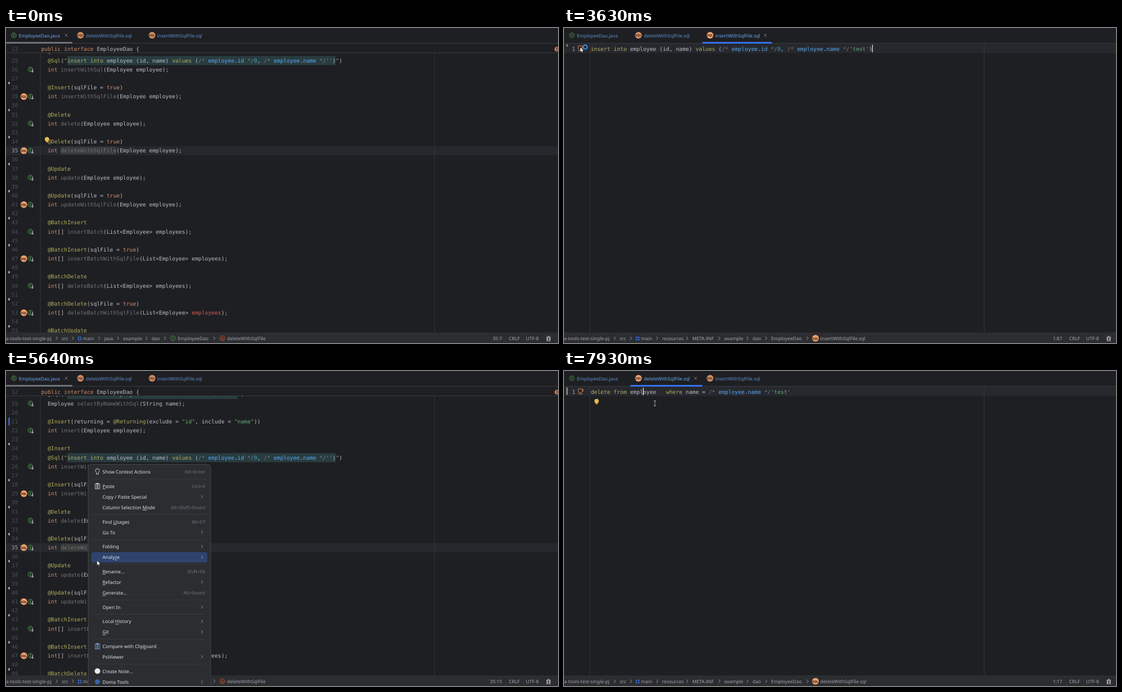
An HTML page with a canvas for the animation above (8000 ms loop, 990 px wide and 565 px high).

```html
<!DOCTYPE html>
<html lang="en">
<head>
<meta charset="utf-8">
<title>Jumping between DAO and SQL files</title>
<style>
  html, body { margin: 0; width: 100%; height: 100%; overflow: hidden; background: #1e1f22; }
  canvas { display: block; }
</style>
</head>
<body>
<canvas id="stage" width="990" height="565"></canvas>
<script>
const ctx = document.getElementById('stage').getContext('2d');
const LOOP = 8000, ROW = 16.16, CHAR = 5.872;
const MONO = '9.75px "DejaVu Sans Mono", monospace';
const UI = '8.5px "Noto Sans", "Open Sans", sans-serif';
const BADGE = 'bold 5.4px "Open Sans", sans-serif';
const C = {
  bg: '#1e1f22', panel: '#2b2d30', line: '#393b40', row: '#26282e', plain: '#bcbec4', ui: '#a3a6ad',
  ann: '#b3ae60', sql: '#b3ae60', key: '#cf8e6d', str: '#6aab73', dim: '#6f737a', rem: '#7a7e85',
  bind: '#56a8f5', num: '#2aacb8', bad: '#d95c55', orange: '#f2a06c', green: '#57965c', blue: '#3574f0'
};

const JAVA = /(?<ann>@\w+)|(?<key>\b(?:int|public|interface|true)\b)|(?<str>"\w*"?)|(?<dim>\b[a-z]\w+(?=\())/g;
const JAVA_ERROR = new RegExp(JAVA.source + '|(?<bad>\\bemployees\\b)', 'g');
const SQL = /(?<rem>\/\*|\*\/)|(?<sql>\b(?:insert|into|values|select|delete|from|where)\b)|(?<bind>\bemployee(?=\.)|(?<=\.)\w+)|(?<num>\b0\b)|(?<str>'\w*')/g;

const FIRST_LINE = 18, ERROR_LINE = 53;
const SOURCE = `@Sql("select * from employee where name = /* name */'test'")
Employee selectByNameWithSql(String name);

@Insert(returning = @Returning(exclude = "id", include = "name"))
int insert(Employee employee);

@Insert
@Sql("insert into employee (id, name) values (/* employee.id */0, /* employee.name */'')")
int insertWithSql(Employee employee);

@Insert(sqlFile = true)
int insertWithSqlFile(Employee employee);

@Delete
int delete(Employee employee);

@Delete(sqlFile = true)
int deleteWithSqlFile(Employee employee);

@Update
int update(Employee employee);

@Update(sqlFile = true)
int updateWithSqlFile(Employee employee);

@BatchInsert
int[] insertBatch(List<Employee> employees);

@BatchInsert(sqlFile = true)
int[] insertBatchWithSqlFile(List<Employee> employees);

@BatchDelete
int[] deleteBatch(List<Employee> employees);

@BatchDelete(sqlFile = true)
int[] deleteBatchWithSqlFile(List<Employee> employees);

@BatchUpdate`.split('\n');

const FILES = {
  insert: { name: 'insertWithSqlFile', pos: '1:87', caret: 86,
    sql: "insert into employee (id, name) values (/* employee.id */0, /* employee.name */'test')" },
  delete: { name: 'deleteWithSqlFile', pos: '1:17', caret: 16,
    sql: "delete from employee   where name = /* employee.name */'test'" }
};

const TABS = [
  { id: 'dao', label: 'EmployeeDao.java', x: 0, w: 119, icon: 14, text: 23, close: 108 },
  { id: 'delete', label: 'deleteWithSqlFile.sql', x: 119, w: 129, icon: 133.5, text: 143, close: 236 },
  { id: 'insert', label: 'insertWithSqlFile.sql', x: 248, w: 125, icon: 262, text: 271, close: 361 }
];

// "&" marks the mnemonic, ">" a submenu, "-" a separator
const MENU = [
  ['Show Context Actions', 'Alt+Enter'], '-',
  ['&Paste', 'Ctrl+V'], ['Copy / Paste Special', '>'], ['Column Selection &Mode', 'Alt+Shift+Insert'], '-',
  ['Find &Usages', 'Alt+F7'], ['Go To', '>'], '-',
  ['Folding', '>'], ['Analy&ze', '>'], '-',
  ['&Rename...', 'Shift+F6'], ['&Refactor', '>'], ['&Generate...', 'Alt+Insert'], '-',
  ['Open In', '>'], '-',
  ['Local &History', '>'], ['&Git', '>'], '-',
  ['Compare with Clip&board', ''], ['PsiViewer', '>'], '-',
  ['Create Note...', ''], ['Doma Tools', '>']
];

// pointer waypoints: time, x, y
const PATH = [
  [70, 945, 556], [810, 250, 258], [880, 248, 257], [1280, 40, 128], [1480, 32, 124], [2250, 32, 124],
  [2610, 30, 50], [2880, 29, 34], [3800, 29, 34], [4180, 95, 183], [4850, 148, 314], [5540, 148, 314],
  [6050, 295, 562], [6290, 295, 562], [6560, 412, 556], [7130, 412, 556], [7880, 163, 58], [LOOP, 163, 58]
];

function rect(x, y, w, h, color, r = 0) {
  ctx.fillStyle = color;
  ctx.beginPath();
  ctx.roundRect(x, y, w, h, r);
  ctx.fill();
}
function circle(x, y, r, fill, stroke, width = 1) {
  ctx.beginPath();
  ctx.arc(x, y, r, 0, Math.PI * 2);
  if (fill) { ctx.fillStyle = fill; ctx.fill(); }
  if (stroke) { ctx.strokeStyle = stroke; ctx.lineWidth = width; ctx.stroke(); }
}
function draw(d, x, y, stroke, fill, width = 1) {
  const path = new Path2D(d);
  ctx.save();
  ctx.translate(x, y);
  if (fill) { ctx.fillStyle = fill; ctx.fill(path); }
  if (stroke) { ctx.strokeStyle = stroke; ctx.lineWidth = width; ctx.stroke(path); }
  ctx.restore();
}
function text(s, x, y, color = C.ui, font = UI, align = 'left') {
  ctx.font = font;
  ctx.textAlign = align;
  ctx.fillStyle = color;
  ctx.fillText(s, x, y);
}
function code(s, x, y, rules) {
  let end = 0;
  for (const m of [...s.matchAll(rules), { 0: '', index: s.length, groups: {} }]) {
    text(s.slice(end, m.index), x + end * CHAR, y, C.plain, MONO);
    const kind = Object.keys(m.groups).find(k => m.groups[k]);
    if (kind) text(m[0], x + m.index * CHAR, y, C[kind], MONO);
    end = m.index + m[0].length;
  }
}

function sqlIcon(x, y) {
  circle(x, y, 6, C.orange);
  text('SQL', x, y + 2, '#1b1410', BADGE, 'center');
}
function letterIcon(letter, x, y, color, fill) {
  circle(x, y, 4.4, fill, color, 0.8);
  text(letter, x, y + 2.3, color, '6.5px "DejaVu Sans Mono", monospace', 'center');
}
const interfaceIcon = (x, y) => letterIcon('I', x, y, C.green, '#253627');
const chevron = (x, y, size = 3) => draw(`M${-size / 2} ${-size}L${size / 2} 0L${-size / 2} ${size}`, x, y, '#9da0a8');
function bulb(x, y) {
  circle(x, y, 3.9, '#e9bb4c');
  rect(x - 1.8, y + 3.2, 3.6, 2.6, '#c9a24a', 1);
}

function tabs(active, focused) {
  rect(0, 27, 990, 1, C.line);
  for (const tab of TABS) {
    const on = tab.id === active;
    ctx.globalAlpha = on ? 1 : 0.85;
    tab.id === 'dao' ? interfaceIcon(tab.icon, 13) : sqlIcon(tab.icon, 13);
    ctx.globalAlpha = 1;
    text(tab.label, tab.text, 17, on ? '#6aa9f7' : '#5b8fce');
    if (!on) continue;
    draw('M-2.5-2.5L2.5 2.5M2.5-2.5L-2.5 2.5', tab.close, 13, '#868a91', null, 0.9);
    rect(tab.x, 25, tab.w, 3, focused ? C.blue : '#6f737a', 1);
  }
}

function statusBar(crumbs, pos, shift) {
  rect(0, 546, 990, 19, C.panel);
  crumbs.forEach(([label, x, icon], i) => {
    const start = x - (icon === 'folder' ? 9 : icon ? 14 : 0);
    if (i) chevron(start - 9, 556.5);
    if (icon === 'folder') { ctx.strokeStyle = C.blue; ctx.lineWidth = 1.2; ctx.strokeRect(129.5, 554.5, 5, 5); }
    if (icon === 'interface') interfaceIcon(x - 8.5, 556.5);
    if (icon === 'method') letterIcon('m', x - 8.5, 556.5, '#d8694f', '#40261f');
    if (icon === 'sql') sqlIcon(x - 8.5, 556.5);
    text(label, x, 560);
  });
  text(pos, 889.5 + shift, 560, C.ui, UI, 'right');
  text('CRLF', 902 + shift, 560);
  text('UTF-8', 932.5 + shift, 560);
  draw('M-2-2Q0-7 2-2M-2.5-2H2.5V3Q0 6 -2.5 3ZM-4-3L-2.5-1M4-3L2.5-1M-4 1H4M-4 5L-2 3M4 5L2 3', 973 + shift, 557, '#ced0d6');
}
const ROOT = [['a-tools-test-single-pj', 0], ['src', 100], ['main', 138, 'folder']];

function daoView({ first, line, pos, focused, showBulb }) {
  const rowY = n => 58.3 + (n - first) * ROW;
  ctx.save();
  ctx.beginPath();
  ctx.rect(0, 45, 990, 501);
  ctx.clip();
  rect(0, rowY(line) - 8, 990, ROW, C.row);
  rect(61, 45, 1, 501, '#313438');
  rect(768, 45, 1, 501, '#33353a');
  for (let n = first - 1; n < first + 31; n++) {
    const s = SOURCE[n - FIRST_LINE], y = rowY(n), base = y + 3.3, x = 63 + 2 * CHAR;
    text(n, 21.6, base, n === line ? '#a1a3ab' : '#4b5059', MONO, 'right');
    if (s === '' && n > 20) rect(4, y + 5.8, 3, 4.4, '#a0a3a8', 1.5);
    if (n === 21) rect(4, y - 7, 3, 14, '#375fad', 1);
    if (n === line) {
      const name = s.match(/\w+(?=\()/);
      rect(x + name.index * CHAR, y - 7, name[0].length * CHAR, 14, '#373b39');
      if (focused) rect(x + name.index * CHAR, y - 7, 1.5, 14, '#ced0d6');
    }
    if (s.startsWith('@Sql')) {
      const [head, sql, tail] = s.split('"'), sqlX = x + 6 * CHAR, endX = sqlX + sql.length * CHAR;
      rect(sqlX, y - 8, endX - sqlX, ROW, '#293c40');
      code(head + '"', x, base, JAVA);
      code(sql, sqlX, base, SQL);
      code('"' + tail, endX, base, JAVA);
    } else code(s, x, base, n === ERROR_LINE ? JAVA_ERROR : JAVA);
    if (s.includes('WithSqlFile(')) sqlIcon(32, y);
    if (s.endsWith(');')) {
      interfaceIcon(43.8, y - 0.3);
      draw('M0-3V2.5M-2 .7L0 2.7L2 .7', 47.6, y + 2.2, '#ced0d6');
    }
  }
  if (showBulb) bulb(73.5, 199.5);
  ctx.restore();

  rect(0, 44, 990, 1, C.line);
  text('12', 21.6, 40.6, '#4b5059', MONO, 'right');
  code('public interface EmployeeDao {', 63, 40.6, JAVA);
  circle(988, 38, 4.3, '#d9763f');
  rect(987.3, 35.5, 1.4, 3, C.bg);
  rect(987.3, 39.3, 1.4, 1.4, C.bg);
  tabs('dao', focused);
  const method = SOURCE[line - FIRST_LINE].match(/\w+(?=\()/)[0];
  statusBar([...ROOT, ['java', 176], ['example', 210], ['dao', 261],
    ['EmployeeDao', 308, 'interface'], [method, 396.5, 'method']], pos, 0);
}

function sqlView(id, caretOn, showBulb) {
  const file = FILES[id];
  rect(0, 28, 990, 17, C.row);
  rect(46, 28, 1, 518, '#313438');
  rect(753, 28, 1, 518, '#33353a');
  rect(4, 29, 3, id === 'delete' ? 14 : 4.5, '#7d8087', 1.5);
  text('1', 20.2, 40.6, '#a1a3ab', MONO, 'right');
  draw('M-4-4H3V1Q3 3 1 3H-2Q-4 3 -4 1ZM3-3H5V0H3M-4 5H4', 29.5, 36, '#d07a45');
  code(file.sql, 48, 40.6, SQL);
  if (caretOn) rect(48 + file.caret * CHAR - 0.5, 30, 1.5, 13.5, '#ced0d6');
  if (showBulb) bulb(58.5, 54);
  tabs(id, true);
  statusBar([...ROOT, ['resources', 176], ['META-INF', 230], ['example', 287.5], ['dao', 338],
    ['EmployeeDao', 371.5], [file.name + '.sql', 459.5, 'sql']], file.pos, 4);
}

function popup(x, y, w, h, filled) {
  ctx.beginPath();
  ctx.roundRect(x, y, w, h, 5);
  if (filled) { ctx.fillStyle = C.panel; ctx.fill(); }
  ctx.strokeStyle = filled ? '#43454a' : '#56595f';
  ctx.lineWidth = 1;
  ctx.stroke();
}
function menuLabel(label, x, y) {
  const [before, after] = label.split('&');
  text(before + (after ?? ''), x, y, '#dfe1e5');
  if (after) rect(x + ctx.measureText(before).width, y + 1.3, ctx.measureText(after[0]).width, 0.8, '#dfe1e5');
}
function menuIcon(label, y) {
  const x = 164;
  if (label.startsWith('Show')) draw('M-1.5 2Q-3.5 0-3.5-2A3.5 3.5 0 0 1 3.5-2Q3.5 0 1.5 2V4.5H-1.5Z', x, y, '#ced0d6');
  if (/Paste$|^Compare/.test(label))
    draw('M-4-4H4V5H-4ZM-1.5-5H1.5V-3H-1.5ZM-2-1H2M-2 1H2M-2 3H2', x, y, label[0] === 'C' ? '#7fa6d8' : '#ced0d6');
  if (label.startsWith('Create')) circle(x, y, 5, '#e8e9eb');
  if (label.startsWith('Doma')) circle(x, y, 4.5, '#3a62ad');
}
function contextMenu(t, pointer) {
  popup(147.5, 167.5, 219.5, 420, true);
  const submenu = t >= 6050;
  let y = 180.7;
  for (const item of MENU) {
    if (item === '-') {
      rect(155, y - 6.6, 204, 1, C.line);
      y += 6.5;
      continue;
    }
    const [label, hint] = item;
    const hovered = pointer.x > 153 && Math.abs(pointer.y - y) < 9.5;
    if (submenu ? label === 'Doma Tools' : hovered) rect(153, y - 9, 208, 18.5, '#2e436e', 4);
    menuIcon(label, y);
    menuLabel(label, 173, y + 3.4);
    if (hint === '>') chevron(351.5, y, 2.6);
    else text(hint, 357.5, y + 3.4, C.dim, UI, 'right');
    y += 19.1;
  }
  if (!submenu) return;
  popup(365.5, 540.5, 124, 45, true);
  if (pointer.x > 366) rect(370, 545, 115, 18.5, '#2e436e', 4);
  menuLabel('Jump to SQL', 377.5, 557.2);
  text('Alt+D', 479.5, 557.2, C.dim, UI, 'right');
}

function pointerAt(t) {
  const i = PATH.findIndex(p => p[0] > t);
  const [t0, x0, y0] = PATH[i - 1], [t1, x1, y1] = PATH[i];
  const u = (t - t0) / (t1 - t0), k = u * u * (3 - 2 * u);
  return { x: x0 + (x1 - x0) * k, y: y0 + (y1 - y0) * k };
}
const SHAPES = {
  arrow: 'M0 0V9.6L2.2 7.6L3.7 11L5.2 10.3L3.8 7.1H6.8Z',
  hand: 'M-1 1Q0-.8 1 1V5L5 6Q6.2 6.4 6 8L5.2 12.5H-.8L-3.6 8.3Q-3.8 6.8-2.4 7.2L-1 8.4Z'
};
function drawPointer({ x, y }, kind) {
  if (kind === 'beam') draw('M-2-4.5H2M0-4.5V4.5M-2 4.5H2', x, y, '#b4b6ba', null, 0.9);
  else draw(SHAPES[kind], x, y, '#111', '#fff', 0.8);
}

function render(t) {
  rect(0, 0, 990, 565, C.bg);
  const pointer = t < 70 ? null : pointerAt(t);
  const view = t < 1860 ? 'dao' : t < 3770 ? 'insert' : t < 6800 ? 'dao' : 'delete';
  const menu = view === 'dao' && t >= 5250;

  if (t < 1860) daoView({ first: 25, line: 35, pos: '35:7', focused: false, showBulb: true });
  else if (view === 'insert') sqlView('insert', t < 2320 || t >= 2860, false);
  else if (t < 5050) daoView({ first: 19, line: 29, pos: '29:7', focused: true, showBulb: t > 4500 });
  else if (view === 'dao') daoView({ first: 19, line: 35, pos: '35:15', focused: t < 5160, showBulb: false });
  else sqlView('delete', true, t > 7500);

  if (menu) contextMenu(t, pointer);
  else if (view === 'dao' && t >= 5160) popup(147.5, 167.5, 219.5, 420, false);
  if (!pointer) return;

  const { x, y } = pointer, busy = t >= 3430 && t < 3770;
  const iconY = view === 'dao' ? 123 : 37;
  const gutter = view === 'dao' ? 61 : 46;
  const overIcon = x > 24 && x < gutter && Math.abs(y - iconY) < 9 && t < 3430;
  const outside = y > 546 || y < 28 || x < gutter;
  const moved = menu && t >= 5580;
  drawPointer(pointer, overIcon ? 'hand' : outside || moved ? 'arrow' : 'beam');
  if (busy) circle(x + 9, y, 3.6, null, '#3a97e0', 2);
}

ctx.textRendering = 'geometricPrecision';
const start = performance.now();
function frame() {
  render((performance.now() - start) % LOOP);
  requestAnimationFrame(frame);
}
frame();
</script>
</body>
</html>
```
